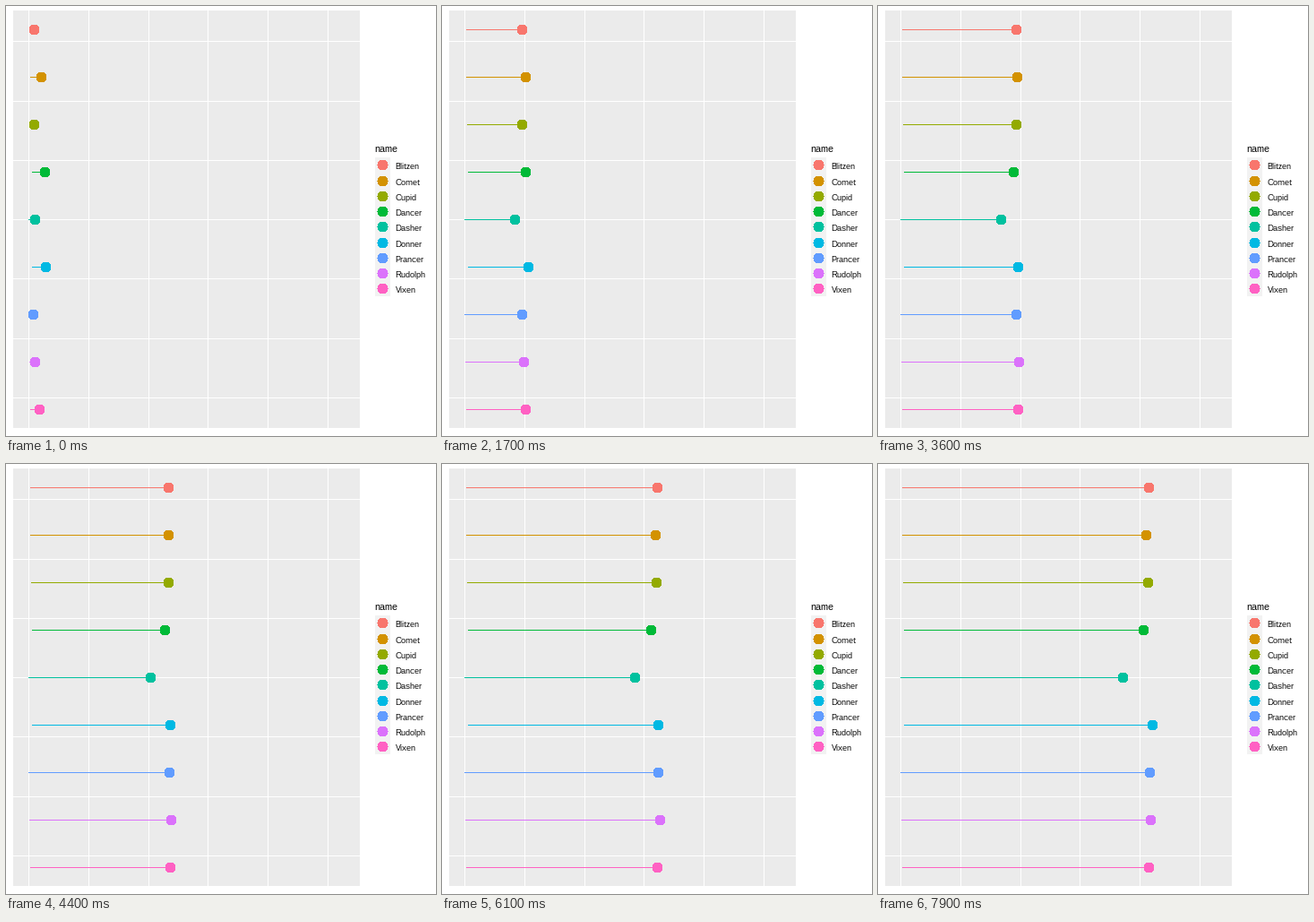
A matplotlib script for the animation above (8000 ms loop, 480 by 480 pixels).

```python
import numpy as np
import matplotlib.pyplot as plt
from matplotlib.animation import FuncAnimation
from matplotlib.patches import Circle, Rectangle

plt.rcParams["font.family"] = "Liberation Sans"
plt.rcParams["text.hinting"] = "native"
plt.rcParams["text.hinting_factor"] = 1
SIZE, DPI, STEP, FRAMES = 480, 100, 100, 80
PX = 72 / DPI
LEFT, TOP, WIDTH, HEIGHT = 8, 5, 387, 466

# name, colour, tail x, first x, last x, bow (lead over a steady pace at half time)
RUNNERS = [
    ("Blitzen", "#F8766D", 27, 31, 302, -1),
    ("Comet", "#D39200", 27, 39, 299, -3),
    ("Cupid", "#93AA00", 28, 31, 301, 0),
    ("Dancer", "#00BA38", 29, 43, 296, -7.5),
    ("Dasher", "#00C19F", 25, 32, 273, -5),
    ("Donner", "#00B9E3", 29, 44, 306, -7.5),
    ("Prancer", "#619CFF", 25, 30, 303, 0),
    ("Rudolph", "#DB72FB", 26, 32, 304, 1),
    ("Vixen", "#FF61C3", 27, 37, 302, -2),
]

fig = plt.figure(figsize=(SIZE / DPI, SIZE / DPI), dpi=DPI, facecolor="white")
ax = fig.add_axes([0, 0, 1, 1])
ax.set_xlim(0, SIZE)
ax.set_ylim(SIZE, 0)
ax.axis("off")


def box(x, y, w, h, color, z=1):
    return ax.add_patch(Rectangle((x, y), w, h, fc=color, lw=0, zorder=z,
                                  antialiased=False))


def dot(x, y, color):
    return ax.add_patch(Circle((x + 0.5, y + 0.5), 5.5, fc=color, lw=0,
                               zorder=4, antialiased=False))


def label(x, y, text, px):
    ax.text(x, y, text, fontsize=px * PX, color="black", va="baseline")


# panel and grid
box(LEFT, TOP, WIDTH, HEIGHT, "#EBEBEB")
for k in range(6):
    box(round(25 + 66.8 * k), TOP, 1, HEIGHT, "white", 2)
for k in range(7):
    box(LEFT, round(39.3 + 66.27 * k), WIDTH, 1, "white", 2)

# legend frame
label(411.5, 163, "name", 11)
box(412, 169, 17, 155, "#F2F2F2")

lines, dots = [], []
for i, (name, color, tail, first, last, bow) in enumerate(RUNNERS):
    key_y = int(177.74 + 17.28 * i)
    box(414, key_y, 13, 1, color, 3)
    dot(420, key_y, color)
    label(434.5, key_y + 5, name, 9)

    row = 26 + 53 * i
    lines.append(box(tail, row, 1, 1, color, 3))
    dots.append(dot(first, row, color))


def update(frame):
    u = frame / (FRAMES - 1)
    for (*_, first, last, bow), line, d in zip(RUNNERS, lines, dots):
        x = round(first + (last - first) * u + bow * np.sin(np.pi * u))
        line.set_width(x - line.get_x())
        d.center = (x + 0.5, d.center[1])
    return lines + dots


anim = FuncAnimation(fig, update, frames=FRAMES, interval=STEP,
                     repeat=True, repeat_delay=0, blit=False)
plt.show()
```
